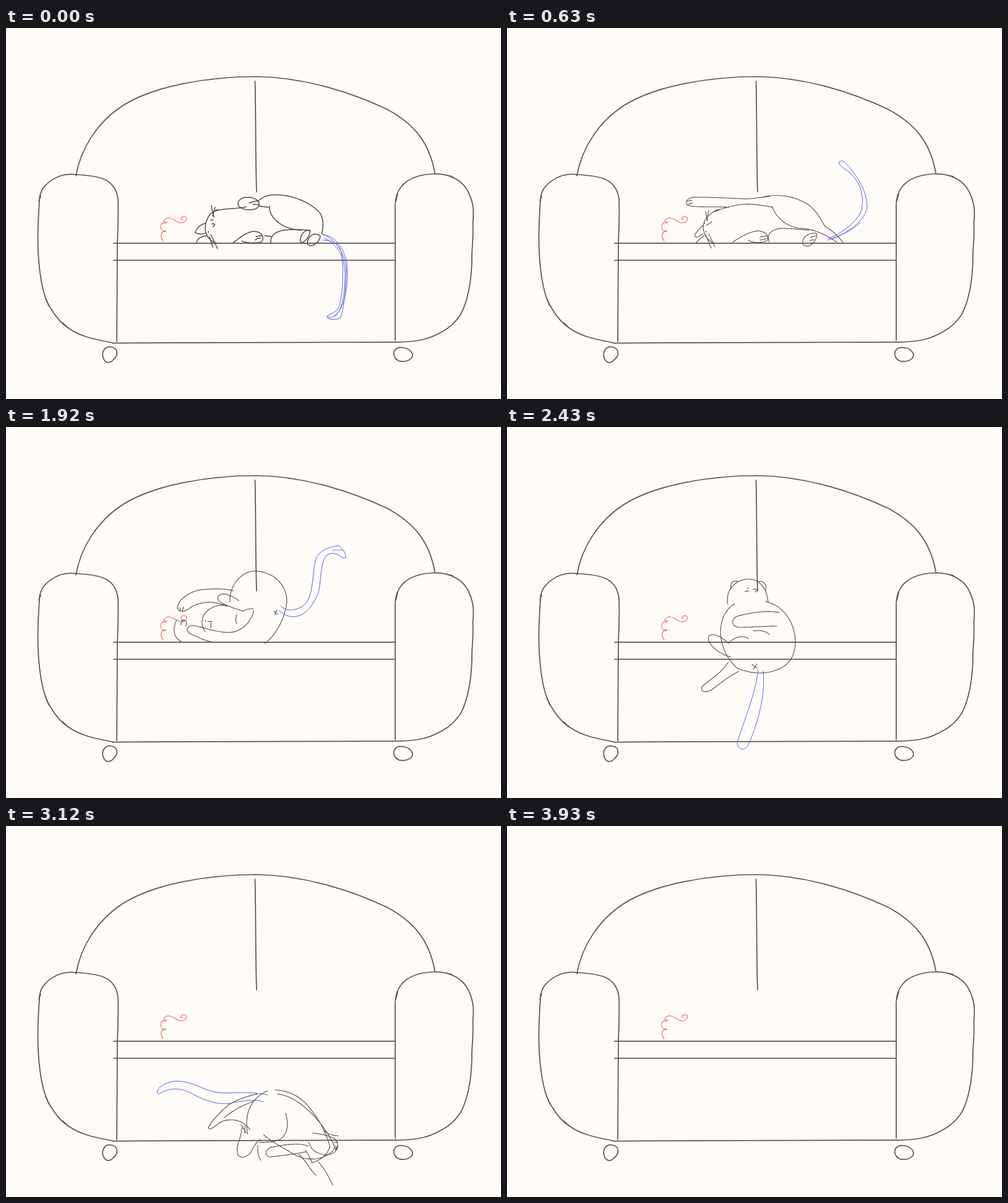
An HTML page that plays this animation: 800 by 600 pixels, repeating every 4.5 s.

```html
<!DOCTYPE html>
<html lang="en">
<head>
<meta charset="utf-8">
<title>Cat on a sofa</title>
<style>
  html, body { margin: 0; width: 100%; height: 100%; overflow: hidden; background: #fffcf7; }
  svg { display: block; width: 800px; height: 600px; }
  path { fill: none; stroke-linecap: round; stroke-linejoin: round; }
  #sofa { stroke: #5a5756; stroke-width: 1.75; }
  #spring { stroke: #f0675f; stroke-width: 1.1; }
  #cat { stroke: #4f4c4b; }
  #tail { stroke: #5c5fdd; stroke-width: 1; }
</style>
</head>
<body>
<svg viewBox="0 0 800 600">
  <g id="sofa">
    <path d="M113 239C121 194 148 152 188 126C240 93 325 79 405 78.500C485 80 560 105 615 131C660 155 684 185 693 234"/>
    <path d="M402.500 86C404 145 403 205 405 265"/>
    <path d="M113 237C85 233 53 253 54 280C51 320 51 340 52 362C54 400 60 435 72 453C82 470 92 480 102 486C120 499 145 504 172 509"/>
    <path d="M113 237C150 239 177 243 181 277C182 300 181 320 180 348L179 507"/>
    <path d="M629 505L629 290C628 256 650 238 690 236C722 235 740 250 747 265C757 285 756 300 754.500 315C756 345 752 360 753 375C752 410 747 440 735 463C725 478 715 486 705 491C685 503 665 508 630 508"/>
    <path d="M172 509.500L630 508M174 348L629 348M174 375.500L628 375.500"/>
    <path d="M170 516C160 514 154 524 157 533C160 543 168 543 174 536C183 528 180 517 170 516"/>
    <path d="M642 517C630 515 624 523 628 532C633 542 648 541 655 534C661 527 652 518 642 517"/>
    <path d="M53 280L56 272M630 280L633 268M712 238L721 240M64 437L69 449M92 477L100 485"/>
  </g>
  <path id="spring" d="M254 344C249 339 250 332 254 329C258 331 260 327 257 328C249 329 248 320 253 315C258 317 262 313 259 314C251 315 256 308 262 307C272 307 276 316 284 315C292 314 295 306 288 305C282 305 281 311 285 310"/>
  <path id="cat"/>
  <path id="tail"/>
</svg>
<script>
const LOOP = 4500, POINTS = 64;

// Strokes with the same name blend into each other.
const poses = {
  none: {},
  rest: {
    head: 'M343 294C330 296 322 310 322 325C323 338 332 346 341 348',
    back: 'M338 296C355 291 375 293 388 289',
    rump: 'M406 281C416 272 425 269 440 270C470 271 498 287 508 300C514 312 513 322 510 333',
    thigh: 'M426 288C424 305 445 326 478 327',
    leg: 'M428 347C427 332 440 327 460 326C475 326 485 326 492 328',
    arm: 'M404 277C390 270 374 275 375 285C377 294 397 297 406 291C412 286 409 280 404 277',
    toes: 'M393 283L407 279M399 285L409 286M409 288L424 290',
    arm2: 'M367 347C375 342 383 333 398 329C412 328 418 337 414 345C408 349 385 348 381 344',
    toes2: 'M404 337L413 336M403 343C406 339 409 340 412 340',
    belly: 'M418 336L428 337',
    foot: 'M476 340C478 330 486 326 491 327C493 333 484 346 479 347C475 347 475 343 476 340',
    foot2: 'M488 343C492 332 503 331 508 337C505 350 492 355 488 350C486 347 487 345 488 343',
    ear: 'M322 316C313 318 306 326 306 331C312 334 318 334 323 331M324 336C313 337 308 343 308 348',
    face: 'M333 317C338 315 339 320 334 321M331 311L335 310M327 329L327 331',
    whiskers: 'M332 287C333 296 335 300 336 306M338 290L334 304M331 334L342 357M329 338L334 354'
  },
  stretch: {
    head: 'M343 293C330 297 318 308 317 322C318 335 324 343 334 348',
    back: 'M336 297C355 289 375 284 395 285C408 286 420 288 430 290',
    rump: 'M415 273C440 267 470 273 490 288C505 302 508 312 514 321C525 327 537 338 543 347',
    thigh: 'M428 289C435 305 450 322 475 324C500 325 520 338 533 346',
    leg: 'M424 346C418 335 428 324 445 324C460 324 475 326 488 327',
    arm: 'M425 272C410 274 395 277 380 276C350 275 320 273 300 274C291 276 288 281 291 286C300 291 330 288 358 290',
    toes: 'M292 280L299 279M293 285L300 283',
    arm2: 'M365 346C378 338 390 330 405 328C418 329 423 335 421 343C415 348 395 348 390 343',
    toes2: 'M409 338L420 336M409 343L419 341',
    foot: 'M478 346C478 336 490 331 500 332C503 339 494 352 485 353C479 352 477 350 478 346',
    foot2: 'M490 339L499 336M489 344L496 342',
    ear: 'M317 319C308 327 304 333 303 337C308 340 312 336 316 333M318 336C313 340 308 344 306 347',
    face: 'M322 319C327 317 326 317 331 313M318 315L320 316M321 329L323 330',
    whiskers: 'M321 297L324 312M326 295L323 311M321 334L330 356M326 333L336 354'
  },
  roll: {
    head: 'M332 295C318 300 313 318 315 330C318 340 324 346 330 348',
    back: 'M330 296C350 286 390 281 425 280C455 280 480 286 497 291',
    rump: 'M387 284C405 274 425 255 440 252C460 250 475 255 490 267C505 272 525 268 534 269C539 274 533 282 522 285C512 290 500 291 495 295',
    thigh: 'M495 291C500 300 501 310 499 319',
    leg: 'M430 346C418 342 418 330 432 323C450 316 480 316 495 321C505 318 512 320 510 325C508 335 502 345 488 346',
    arm: 'M396 282C375 276 350 268 325 269C305 272 290 286 288 294C289 300 300 298 308 293C318 287 340 284 355 289',
    toes: 'M291 293L294 297M295 291L298 295',
    arm2: 'M345 346C338 338 342 328 355 324C370 321 390 322 393 330C394 338 380 343 370 342',
    toes2: 'M382 331L392 333M380 336L390 337',
    foot: 'M496 322C500 328 504 330 509 322',
    ear: 'M324 298C312 303 305 311 306 318C310 316 314 314 316 312M314 333C308 338 306 345 310 348',
    face: 'M323 316L329 316L326 320M320 312L322 313M320 330L322 331'
  },
  reach: {
    head: 'M357 289C340 285 325 295 319 305C315 315 317 325 322 331',
    back: 'M404 233C432 235 452 253 454 280C452 310 435 338 418 350',
    rump: 'M362 283C360 258 380 232 404 233',
    thigh: 'M400 294C394 294 389 294 383 298C370 293 350 288 343 280C340 272 348 268 358 271C368 275 373 278 376 281',
    leg: 'M400 297C398 312 385 328 365 332C345 334 320 324 302 321C292 322 290 329 297 334C310 340 322 346 335 348',
    arm: 'M368 265C355 261 330 261 310 264C290 270 277 282 277 293C281 301 290 299 298 292C315 282 335 280 357 290',
    toes: 'M281 292L282 297M287 291L285 298',
    arm2: 'M373 303C371 308 371 314 373 318',
    foot: 'M276 312C269 325 270 342 284 347',
    foot2: 'M283 313C291 310 294 318 290 322M282 320L286 312',
    face: 'M326 315L333 314M322 312L323 314M331 316L331 325',
    mark: 'M433 298L439 303M438 296L434 304'
  },
  tumble: {
    head: 'M357 287C352 262 372 245 392 246C408 247 420 260 422 284',
    back: 'M418 282C470 295 478 365 450 385C430 400 400 402 372 390',
    rump: 'M372 390C338 360 336 305 368 286',
    thigh: 'M362 372C340 366 322 350 326 338C334 332 348 340 358 350C366 340 380 336 390 342',
    leg: 'M358 380C345 400 325 410 315 420C312 430 322 430 332 424C345 415 355 405 375 395',
    arm: 'M440 300C420 296 395 300 372 306C360 312 364 324 376 324C395 324 415 322 436 322',
    arm2: 'M398 330C408 328 420 330 424 336',
    ear: 'M362 262C360 252 366 247 374 250M406 250C416 248 420 256 418 264',
    face: 'M384 266L391 265M398 263C403 260 406 264 401 267M388 261L391 261',
    mark: 'M396 384L404 390M404 383L398 392'
  },
  fall: {
    head: 'M427 380C423 355 430 344 442 344C455 346 470 350 476 352',
    back: 'M480 355C495 385 492 425 462 450C435 470 375 475 351 448',
    rump: 'M351 448C325 420 338 372 404 371',
    thigh: 'M337 398C325 385 318 365 324 355C332 350 336 360 341 372C355 362 375 355 390 361C400 366 403 375 403 388L403 403',
    leg: 'M357 457L335 474C315 485 298 497 298 508C302 515 308 510 315 503C330 490 340 480 355 478C385 476 410 470 435 460',
    arm: 'M455 374C450 365 460 361 475 362C495 362 503 370 500 385C492 402 470 406 450 402C430 398 415 385 404 376',
    arm2: 'M405 378C420 376 440 376 448 382C452 390 450 398 444 401C432 398 420 392 410 382',
    foot: 'M455 374C465 376 472 388 465 397C458 400 445 399 436 400',
    ear: 'M426 355C428 347 434 343 440 346M472 348C480 345 484 350 481 356C477 358 473 357 470 355',
    face: 'M432 352L441 349M440 353C446 350 450 356 442 357M434 355L439 356',
    mark: 'M349 424C354 430 354 440 353 448M344 440C352 449 362 452 367 456'
  },
  land: {
    head: 'M533 506C555 510 578 517 578 528C580 540 570 550 555 549C535 548 525 538 521 526',
    back: 'M460 431C490 430 510 440 530 463C548 480 558 500 566 515C572 525 560 545 540 552M466 430C500 432 545 480 560 520',
    rump: 'M425 500C423 470 428 445 455 431',
    thigh: 'M445 433C405 446 365 475 352 500C358 504 366 492 375 487C395 479 412 484 423 497M380 468C395 455 410 448 428 441',
    leg: 'M414 488C416 505 411 520 411 533C416 542 424 537 428 530C430 520 433 512 438 508',
    belly: 'M479 461C484 480 482 495 470 503C460 508 450 508 437 508',
    arm: 'M442 510C460 530 490 548 520 550C545 552 570 545 576 532',
    arm2: 'M525 540C500 545 470 548 455 549C443 547 445 535 455 530C480 524 515 522 527 530',
    foot: 'M505 545C515 555 530 575 539 580',
    foot2: 'M532 540C545 555 550 568 555 577M434 513C433 522 434 530 439 537',
    ear: 'M555 505C560 512 570 515 578 515M515 541C520 550 524 556 527 561',
    face: 'M572 526C579 524 580 532 573 540M573 533L577 536',
    mark: 'M413 486L422 498M421 486L418 497'
  }
};

const tails = {
  none: '',
  hang: 'M511 333C530 340 548 362 550 390C549 425 546 455 540 470C530 472 522 472 518 468C520 461 532 465 539 449C546 420 545 380 542 362C538 348 525 343 512 343M512 335C530 334 546 355 551 380C554 420 546 455 532 464C527 468 522 470 519 466M515 340C535 350 548 370 548 400C547 430 545 455 530 468',
  swing: 'M513 335C540 338 570 350 590 375C600 390 612 400 611 410C606 417 598 412 594 404C580 380 560 360 530 345C524 343 518 343 513 343',
  up: 'M518 343C545 335 578 315 582 290C583 262 560 232 549 220C545 214 536 213 536 218C538 226 555 230 565 247C575 262 578 285 570 302C555 322 535 335 520 340M525 342C545 333 560 325 571 315',
  wag: 'M520 343C550 335 580 318 590 295C600 275 606 255 604 242C602 234 594 236 594 243C594 262 588 285 575 300C558 322 535 335 520 340',
  wave: 'M497 322C515 322 525 305 540 294C560 284 580 300 598 300C610 295 605 275 612 269C618 275 620 295 612 306C600 316 585 306 565 302C545 302 530 325 510 340C505 345 495 346 488 343',
  high: 'M470 307C500 310 530 290 550 255C565 225 590 190 600 172C606 166 612 170 610 178C605 205 590 240 570 270C545 305 510 325 470 320',
  hook: 'M444 290C455 300 475 298 487 282C497 265 495 235 501 212C508 198 525 193 538 192C545 197 551 207 549 213C540 212 535 200 520 206C508 215 510 245 505 268C495 290 485 305 465 307C455 307 448 302 441 297M527 199L544 199',
  dip: 'M444 292C458 328 480 332 495 305C505 280 500 245 508 225C515 210 528 205 540 204C546 207 549 215 547 222C540 222 535 212 524 218C514 228 516 250 510 280C500 320 475 340 452 322C448 315 444 305 441 297',
  under: 'M414 394C418 435 405 480 390 514C384 526 372 522 372 510C385 470 402 430 406 392',
  drop: 'M375 427C350 428 325 405 312 380C300 360 292 345 280 340C268 337 260 341 260 347C272 355 292 370 302 388C318 412 340 430 370 433M305 398C310 418 330 432 367 433',
  whip: 'M420 432C385 428 350 420 320 395C300 375 270 370 250 380C245 386 248 390 254 390C275 385 295 395 310 412C340 440 380 446 420 440',
  flow: 'M465 431C440 424 415 430 398 435C370 442 345 428 322 427C300 426 285 440 282 452L287 450C300 437 320 433 340 441C360 448 380 454 400 449C415 443 440 432 457 444M403 442C420 435 440 432 457 444'
};

// [time, shape, shift x, shift y]
const catKeys = [
  [0, 'rest'], [100, 'rest'], [630, 'stretch'], [1300, 'stretch'], [1380, 'roll'], [1450, 'roll'],
  [1920, 'reach'], [2150, 'reach'], [2400, 'tumble'], [2700, 'fall', 8, 6], [2880, 'fall'],
  [3180, 'land', -30, 4], [3330, 'land', -28, 0], [3480, 'land'], [3660, 'land', 150, -70],
  [3840, 'land', 400, -10], [3930, 'none']
];
const tailKeys = [
  [0, 'hang'], [100, 'hang'], [360, 'swing'], [630, 'up'], [690, 'up'], [900, 'wag'], [1300, 'wag'],
  [1380, 'wave'], [1450, 'wave'], [1680, 'high'], [1920, 'hook'], [1980, 'dip'], [2070, 'hook', -2, 12],
  [2150, 'hook', -2, 12], [2400, 'under'], [2700, 'drop'], [2880, 'drop'], [3030, 'whip'], [3180, 'flow'],
  [3840, 'flow'], [3930, 'none']
];

// Moments when a new drawing appears.
const steps = [
  0, 180, 240, 330, 390, 480, 540, 630, 690, 780, 840, 900, 1380,
  1530, 1590, 1680, 1740, 1830, 1920, 1980, 2070, 2220, 2310, 2400, 2490, 2610, 2700,
  2880, 2970, 3030, 3120, 3180, 3330, 3480, 3540, 3630, 3690, 3780, 3840, 3930
];

const catPath = document.getElementById('cat');
const tailPath = document.getElementById('tail');
const ruler = document.createElementNS('http://www.w3.org/2000/svg', 'path');
const lerp = (a, b, u) => a + (b - a) * u;

function sample(d) {
  ruler.setAttribute('d', d);
  const length = ruler.getTotalLength();
  return Array.from({ length: POINTS }, (_, i) => {
    const p = ruler.getPointAtLength(length * i / (POINTS - 1));
    return [p.x, p.y];
  });
}

function sampleStrokes(strokes) {
  const out = {};
  for (const [name, d] of Object.entries(strokes)) {
    d.split(/(?=M)/).forEach((part, i) => { if (part) out[name + i] = sample(part); });
  }
  return out;
}

const shapes = {};
for (const name in poses) shapes[name] = sampleStrokes(poses[name]);
const tailShapes = {};
for (const name in tails) tailShapes[name] = sampleStrokes({ tail: tails[name] });

function find(keys, t) {
  const i = keys.findLastIndex(k => k[0] <= t);
  const a = keys[i], b = keys[i + 1] || a;
  const x = a === b ? 0 : (t - a[0]) / (b[0] - a[0]);
  const u = x * x * (3 - 2 * x);
  return { a: a[1], b: b[1], u, dx: lerp(a[2] || 0, b[2] || 0, u), dy: lerp(a[3] || 0, b[3] || 0, u) };
}

// A stroke without a partner shows only close to its own pose.
function blend(set, key, dx, dy) {
  const a = set[key.a], b = set[key.b], u = key.u;
  const main = u < 0.5 ? a : b;
  const near = Math.min(u, 1 - u) < 0.2;
  return Object.keys(main).filter(name => near || (a[name] && b[name])).map(name => {
    const from = a[name] || main[name], to = b[name] || main[name];
    const points = from.map((p, i) =>
      (lerp(p[0], to[i][0], u) + dx).toFixed(1) + ' ' + (lerp(p[1], to[i][1], u) + dy).toFixed(1));
    return 'M' + points.join('L');
  }).join('');
}

let shown = -1;
function draw() {
  const now = performance.now() % LOOP;
  const t = steps.findLast(s => s <= now);
  if (t !== shown) {
    shown = t;
    const cat = find(catKeys, t), tail = find(tailKeys, t);
    catPath.setAttribute('d', blend(shapes, cat, cat.dx, cat.dy));
    catPath.setAttribute('stroke-width', t < 180 ? 1.5 : 1.1);
    tailPath.setAttribute('d', blend(tailShapes, tail, cat.dx + tail.dx, cat.dy + tail.dy));
  }
  requestAnimationFrame(draw);
}
draw();
</script>
</body>
</html>
```
